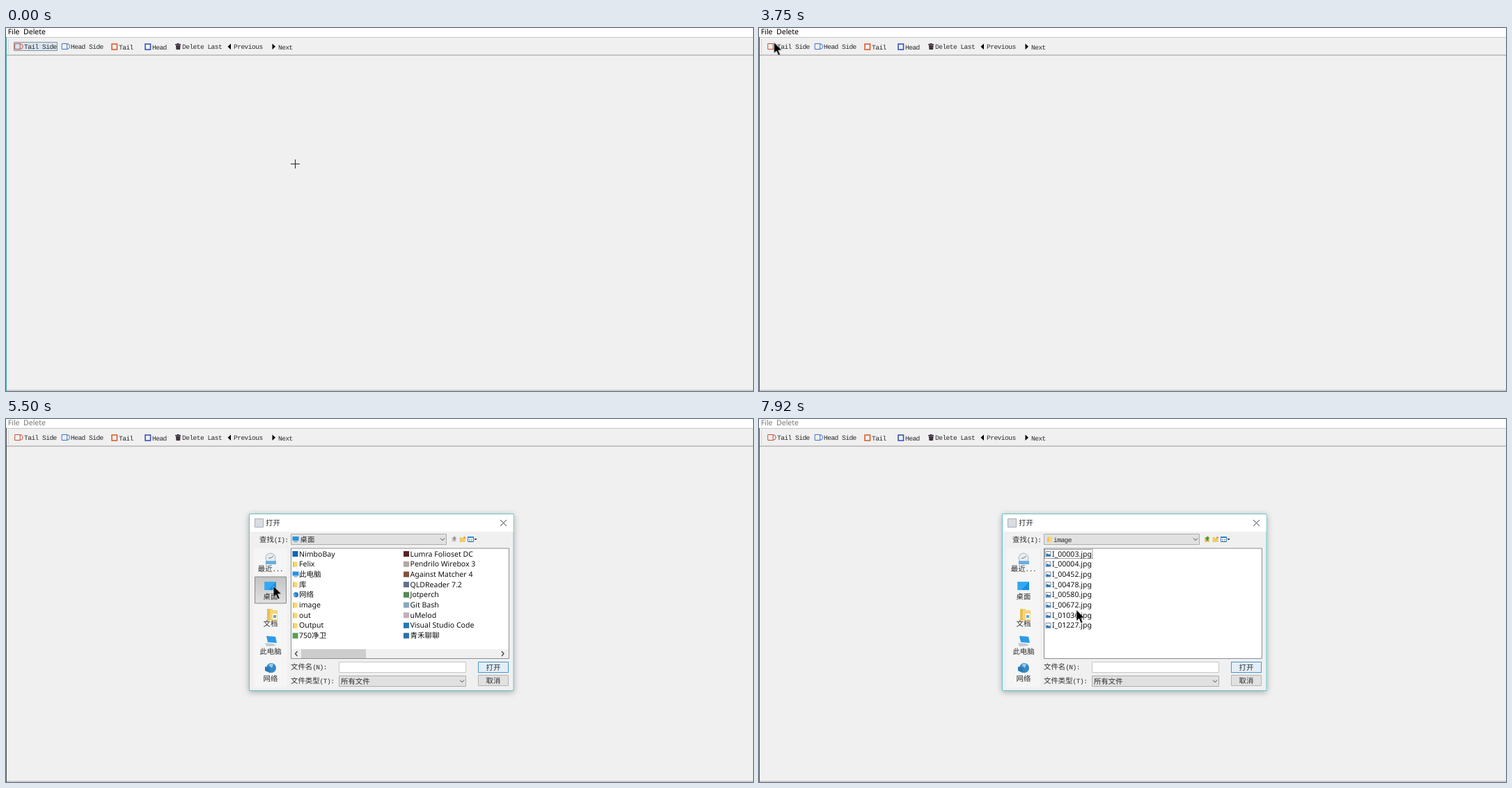
Recreate the animation shown at these times as an HTML page. Size 1073 by 522 pixels, loop 8 s.

```html
<!DOCTYPE html>
<html lang="en">
<head>
<meta charset="utf-8">
<title>Annotation tool</title>
<style>
html, body { margin: 0; width: 100%; height: 100%; overflow: hidden; background: #f0f0f0; }
svg { display: block; width: 1073px; height: 522px; }
text { font: 10.55px "Noto Sans", "Noto Sans CJK SC", "Noto Sans CJK", sans-serif; fill: #111; white-space: pre; text-rendering: geometricPrecision; }
.cjk { font: 10.4px "Noto Sans CJK SC", "Noto Sans CJK", sans-serif; fill: #2c2c2c; }
.mono { font: 9.6px "Liberation Mono", monospace; letter-spacing: -.56px; fill: #2c2c2c; }
.mid { text-anchor: middle; }
.line { fill: none; stroke: #444; }

#menu text { fill: inherit; }
#menu { animation: dim 8s step-end infinite; }
#edge { animation: blur 8s step-end infinite; }
#cross-pos { animation: cross-path 8s linear infinite; }
#arrow-pos { animation: arrow-path 8s linear infinite; }
#dialog { transform-origin: 539.5px 264px; animation: open 8s step-end infinite; }

@keyframes dim { 0% { fill: #000 } 48.75%, 100% { fill: #777 } }
@keyframes blur { 0% { fill: #3fa9ad } 46.875%, 100% { fill: #555 } }
@keyframes open {
  0% { opacity: 0; transform: scale(.95) }
  48.75% { opacity: .4; transform: scale(.96) }
  49.375% { opacity: .76; transform: scale(.987) }
  50%, 100% { opacity: 1; transform: none }
}
@keyframes cross-path {
  0%, 5% { transform: translate(415px, 195px) }
  15.5%, 100% { transform: translate(48px, 40px) }
}
@keyframes arrow-path {
  0%, 16.625% { transform: translate(48px, 31px) }
  21.5% { transform: translate(24.5px, 11px) }
  25.25%, 30% { transform: translate(11px, 6px) }
  35.25%, 51.875% { transform: translate(21.5px, 20.5px) }
  57.625% { transform: translate(351px, 248.5px) }
  59.75% { transform: translate(372px, 244px) }
  64.875%, 68.75% { transform: translate(384px, 240px) }
  70.625% { transform: translate(412px, 255px) }
  78.5% { transform: translate(512.5px, 307px) }
  80.375%, 81% { transform: translate(515px, 308px) }
  86.25% { transform: translate(437px, 271px) }
  90.25%, 100% { transform: translate(456px, 274.5px) }
}
</style>
</head>
<body>
<svg viewBox="0 0 1073 522">
  <defs>
    <linearGradient id="pressed" x2="0" y2="1"><stop stop-color="#c4c4c4"/><stop offset="1" stop-color="#e0e0e0"/></linearGradient>
    <filter id="shadow" x="-10%" y="-10%" width="120%" height="120%"><feDropShadow dx="0" dy="2" stdDeviation="4" flood-opacity=".3"/></filter>
    <g id="folder"><path d="M.5 1h3l1 1H7v7H.5z" fill="#f8d775"/><path d="M.5 2.5H2V9H.5z" fill="#e3b547"/></g>
    <g id="ebooks"><path d="M0 5l4-4 4 3v5H0z" fill="#f0d28a"/><path d="M0 9l3-5 5 5z" fill="#5fb3e4"/></g>
    <g id="monitor"><path d="M0 1h9v6H0z" fill="#2a93dd"/><path d="M2 8h5v1H2z" fill="#789"/></g>
    <g id="globe"><circle cx="5" cy="5" r="3.7" fill="#2f83c5"/><path d="M0 4h4v4z" fill="#74b9e8"/></g>
    <g id="picture"><path d="M.5 1.5h7v7h-7z" fill="#fff" stroke="#789"/><path d="M1 8V6l2-2 2 2 1-1 1 1v2z" fill="#1f78c8"/></g>
    <path id="up" d="M642.5 175v-3H641l3-3.5 3 3.5h-1.5v3z"/>
    <path id="chevron" class="line" d="M-3-1.5L0 1.5 3-1.5"/>
  </defs>

  <path d="M0 0h1073v522H0z" fill="#f0f0f0"/>
  <path d="M0 0h1073v13H0z" fill="#fff"/>
  <path d="M0 13h1073v1H0z" fill="#c4c4c4"/>
  <path d="M0 38.5h1073v1H0z" fill="#999"/>
  <path d="M0 520.5h1073v1H0z" fill="#b0b0b0"/>
  <path d="M3.5 17v20" stroke="#bbb" stroke-dasharray="1 1"/>
  <path id="edge" d="M0 13h1v509H0z"/>

  <path class="hover-delete" d="M22 0h37v12H22z" fill="#e0f0fa"/>
  <path class="hover-file" d="M1 0h20v12H1z" fill="#d5ebf9"/>
  <g id="menu"><text x="2.7" y="9.3">File</text><text x="25" y="9.3">Delete</text></g>

  <path class="tail-on" d="M11.5 20.5h62v12h-62z" fill="#d8e4ee" stroke="#8195a5"/>
  <g fill="none">
    <path stroke="#c8503c" d="M12.7 22.5h7.5v8h-7.5zM20.2 22.5q4 .5 4 4t-4 4"/>
    <path transform="translate(67.5)" stroke="#3c72cc" d="M12.7 22.5h7.5v8h-7.5zM20.2 22.5q4 .5 4 4t-4 4"/>
    <path d="M152 23h7.5v8H152z" stroke="#dc5420" stroke-width="1.5"/>
    <path d="M200 23h7.5v8H200z" stroke="#2b4bbb" stroke-width="1.5"/>
  </g>
  <path d="M243 23h2.5v-1h3v1h2.5v1.5h-8zM244 25h6.5l-.5 6h-5.5z" fill="#30232f"/>
  <path d="M246 26v4m2.500-4v4" stroke="#85737f" stroke-width=".6"/>
  <path d="M323 22.5v8.500l-4.500-4.250zM382.500 22.500v8.500l4.500-4.250z"/>
  <g id="tools"></g>

  <g class="popup">
    <path d="M.5 12.5h61v39h-61z" fill="#f2f2f2" stroke="#bbb"/>
    <path class="popup-hover" d="M2 14h58v18H2z" fill="#91c9f7"/>
    <text x="20" y="27">Open</text><text x="20" y="45">Save</text>
  </g>

  <g id="dialog">
    <path d="M349.5 136.5h379.500v254h-379.500z" fill="#f0f0f0" stroke="#62c7cc" filter="url(#shadow)"/>
    <path d="M350 137h378.500v25H350z" fill="#fff"/>
    <path d="M357.5 143.5h12v12h-12z" fill="#d9dde3" stroke="#a8adb5"/>
    <text class="cjk" x="373" y="153.3">打开</text>
    <path class="line" d="M710 145l9 9m0-9l-9 9"/>
    <text class="cjk" x="364" y="176.8">查找<tspan class="mono">(I):</tspan></text>
    <path d="M409.5 165.5h223v15h-223z" fill="#e1e1e1" stroke="#adadad"/>
    <use href="#chevron" x="627" y="173"/>

    <g class="up-on"><path d="M640 170h4l1-1h2v8h-7z" fill="#edc665"/><use href="#up" fill="#399a3b"/></g>
    <g class="desktop"><path d="M640 170h4l1-1h2v8h-7z" fill="#dadada"/><use href="#up" fill="#999"/></g>
    <path d="M651.5 170h3l1 1h4v6h-8z" fill="#f2cc68"/><circle cx="658.5" cy="170.5" r="1.5" fill="#e6973b"/>
    <path d="M663.5 169.5h8v7h-8z" fill="#fff" stroke="#357cb5"/><path d="M663 169h9v2h-9z" fill="#268ad2"/>
    <path d="M665 173.5h5m-5 2h5" stroke="#789" stroke-dasharray="2 1"/><path d="M672.5 172h4l-2 2z"/>

    <path d="M356 186h48v200h-48z" fill="#f5f5f5"/>
    <path class="documents" d="M357.5 266.5h45v38h-45z" fill="url(#pressed)" stroke="#858585"/>
    <path class="desk-hover" d="M357.5 227h45v38h-45z" fill="#f2f2f2" stroke="#b5b5b5"/>
    <path class="desktop" d="M357.5 227h45v38h-45z" fill="url(#pressed)" stroke="#858585"/>
    <circle cx="380" cy="200" r="7" fill="#e8edf1" stroke="#a9b5be"/><path d="M380 200l4-3m-4 3h-3" stroke="#66737d"/>
    <path d="M373 204h15v5h-15z" fill="#69afe0"/>
    <path d="M371.5 234H388v12h-16.500z" fill="#168fe5"/><path d="M371.5 234H388L377 246h-5.500z" fill="#35a8f4"/>
    <path d="M375 273h7l2 2h6v15h-15z" fill="#f5d578"/><path d="M375 273h4v17h-4z" fill="#e8bd54"/>
    <path d="M383 280h6v8h-6z" fill="#fff"/><path d="M384 282h4v4h-4z" fill="#5aa5d3"/>
    <path d="M374 312l13 1 2 9-13-1z" fill="#2d9be5"/><path d="M372 322l12 1 4 3-14 1z" fill="#bccbd8"/>
    <circle cx="381" cy="358" r="7" fill="#3888c5"/><path d="M377 354q4-4 7-1l-2 5z" fill="#91cdeb"/><path d="M372 356l7 2v7l-7-3z" fill="#2779b9"/>
    <g id="places"></g>

    <path d="M409.5 186h313v158.500h-313z" fill="#fff" stroke="#8a8e95"/>
    <g id="lists"></g>
    <g class="desktop">
      <path d="M410 331h312v13H410z" fill="#f0f0f0"/><path d="M424 331h93v13h-93z" fill="#cdcdcd"/>
      <path class="line" stroke-width="1.3" d="M418.500 334l-3 3.500 3 3.500m293.500-7l3 3.500-3 3.500"/>
    </g>

    <text class="cjk" x="409" y="360.3">文件名<tspan class="mono">(N):</tspan></text>
    <path d="M478.5 349.5h182v15h-182z" fill="#fff" stroke="#c8c8c8"/>
    <path class="caret-a" d="M481 351h1v12h-1z"/><path class="caret-b" d="M481 351h1v12h-1z"/>
    <text class="cjk" x="409" y="379.8">文件类型<tspan class="mono">(T):</tspan></text>
    <path d="M478.5 369.5h182v15h-182z" fill="#e1e1e1" stroke="#adadad"/>
    <text class="cjk" x="481" y="381">所有文件</text><use href="#chevron" x="655" y="377"/>
    <path d="M678.5 349.5h43v15h-43z" fill="#e1e1e1" stroke="#0078d7"/>
    <path class="lit" d="M678.5 349.5h43v15h-43z" fill="#e3eef7" stroke="#4397d2"/>
    <text class="cjk mid" x="700" y="361">打开</text>
    <path d="M678.5 368.5h43v15h-43z" fill="#e1e1e1" stroke="#b5b5b5"/>
    <text class="cjk mid" x="700" y="380">取消</text>
  </g>

  <g id="cross-pos"><path class="cross line" style="stroke:#222" d="M-6 .5H7M.5-6V7"/></g>
  <g id="arrow-pos"><path class="arrow" d="M0 0V16L3.700 12.600 6.400 19 9 17.900 6.300 11.600H11.400Z" stroke="#fff" stroke-width=".6"/></g>
</svg>
<script>
const LOOP = 8000;
// Visible span of each class, in ms.
const phases = {
  cross: [0, 1330], arrow: [1330, LOOP], 'tail-on': [0, 2190],
  'hover-delete': [1560, 1880], 'hover-file': [1880, 3750],
  popup: [2190, 3750], 'popup-hover': [2600, 3750],
  documents: [3900, 5500], desktop: [5500, 7770], images: [7770, LOOP],
  'desk-hover': [4780, 5500], picked: [7380, 7770], lit: [5500, LOOP],
  'caret-a': [3900, 4400], 'caret-b': [4900, 5340]
};
const style = document.createElement('style');
style.textContent = Object.entries(phases).map(([name, [from, to]]) => `
  @keyframes ${name} { 0% { visibility: hidden } ${from / LOOP * 100}% { visibility: visible }
    ${to / LOOP * 100}% { visibility: hidden } }
  .${name} { animation: ${name} 8s step-end infinite }`).join('') + `
  @keyframes up-on { 0% { visibility: visible } ${phases.desktop[0] / LOOP * 100}% { visibility: hidden }
    ${phases.desktop[1] / LOOP * 100}%, 100% { visibility: visible } }
  .up-on { animation: up-on 8s step-end infinite }`;
document.head.append(style);

const fill = (id, html) => document.getElementById(id).innerHTML = html;
const label = (x, y, text, kind = '', extra = '') =>
  `<text class="${kind}" x="${x}" y="${y}" ${extra}>${text}</text>`;
// An icon is either a symbol id or a plain colour.
const icon = (x, y, kind) => kind[0] === '#'
  ? `<path d="M${x} ${y + 1}h8v8h-8z" fill="${kind}"/>`
  : `<use href="#${kind}" x="${x}" y="${y}"/>`;
const column = (items, x = 421) => items.map(([text, kind = 'folder'], i) => {
  const y = 197.5 + 14.7 * i;
  return icon(x - 9.5, y - 8.5, kind) + label(x, y, text);
}).join('');
const place = (kind, heading, items) => `<g class="${kind}">${heading}${items}</g>`;

fill('tools', [[26, 30, 'Tail Side'], [93, 30, 'Head Side'], [162, 30.5, 'Tail'], [210, 30.5, 'Head'],
  [253, 30, 'Delete Last'], [327, 30, 'Previous'], [391, 30.5, 'Next']]
  .map(([x, y, text]) => label(x, y, text, 'mono')).join(''));

fill('places', ['最近<tspan class="mono">...</tspan>', '桌面', '文档', '此电脑', '网络']
  .map((text, i) => label(380, 219 + 39.6 * i, text, 'cjk mid')).join(''));

const documents = [['Orvaxelith'], ['Fenrobit'], ['Mirexa'], ['ZELTAR'], ['My eBooks', 'ebooks'],
  ['Dorwint Files'], ['Mosaic Studio 2015'], ['HuChim Files'], ['Ximbo Files']];
const desktop = [['NimboBay', '#1762b5'], ['Felix'], ['此电脑', 'monitor'], ['库'], ['网络', 'globe'],
  ['image'], ['out'], ['Output'], ['750净卫', '#5c9c50']];
const programs = [['Lumra Folioset DC', '#5b2424'], ['Pendrilo Wirebox 3', '#b5a7a4'],
  ['Against Matcher 4', '#80503c'], ['QLDReader 7.2', '#60718c'], ['Jotperch', '#548a54'],
  ['Git Bash', '#88a9bd'], ['uMelod', '#c5adb9'], ['Visual Studio Code', '#2479b8'], ['青禾聊聊', '#326fa9']];
const images = ['00003', '00004', '00452', '00478', '00580', '00672', '01036', '01227']
  .map(n => [`I_${n}.jpg`, 'picture']);

fill('lists',
  place('documents', icon(414, 168, 'folder') + label(423.5, 176.8, '文档', 'cjk'), column(documents)) +
  place('desktop', icon(411.5, 168, 'monitor') + label(422.5, 176.8, '桌面', 'cjk'),
    column(desktop) + column(programs, 580.5)) +
  place('picked', '<path d="M420 260.5h33.5v14H420z" fill="#0078d7"/>',
    label(421, 271, 'image', '', 'style="fill:#fff"')) +
  place('images', icon(414, 168, 'folder') + label(423, 176.5, 'image', 'mono'),
    column(images) + '<path class="line" stroke-dasharray="1 1" d="M410.5 187.5h68.5v13h-68.5z"/>'));
</script>
</body>
</html>
```
